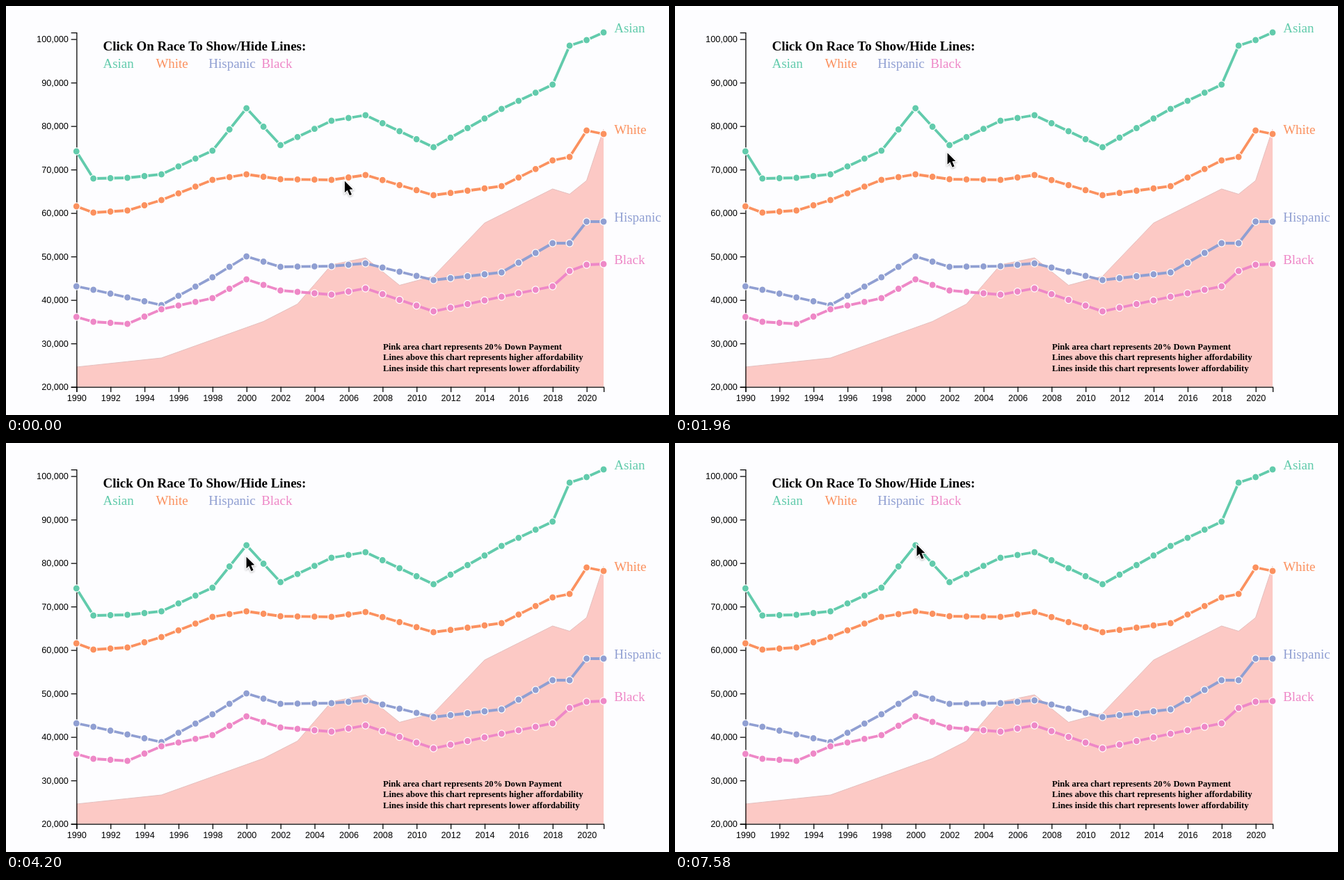
Animation, 953 px wide and 588 px high, one loop 8 s. Source, as an HTML page with a canvas:

```html
<!DOCTYPE html>
<html lang="en">
<head>
<meta charset="utf-8">
<title>Income and down payment</title>
<style>
html, body { margin: 0; width: 100%; height: 100%; overflow: hidden; background: #fdfdff; }
canvas { display: block; }
</style>
</head>
<body>
<canvas id="stage" width="953" height="588"></canvas>
<script>
const W = 953, H = 588, LOOP = 8000;
const U = 1.265; // chart unit in pixels
const HALF = U / 2; // axis lines sit half a unit off the data
const LEFT = 80 * U, RIGHT = 859, TOP = 38, BOTTOM = 547.5;
const YEARS = 31;
const SERIF = '"Liberation Serif", Times, serif';
const SANS = '"Liberation Sans", Arial, sans-serif';

// turning points; the years between are interpolated
const payment = [[0, 519], [5, 506], [11, 453.5], [13, 428.5], [15, 372], [17, 362], [19, 401.5],
  [21, 388.5], [24, 312], [28, 263], [29, 270.5], [30, 251], [31, 177]];
const turns = [0, 1, 3, 5, 8, 10, 12, 15, 17, 21, 25, 28, 29, 30, 31];
const groups = [
  { name: 'Asian', color: '#62cbac', ys: [209, 248, 247, 242, 208, 147, 200, 165, 157, 203, 148, 113, 57, 49, 38] },
  { name: 'White', color: '#fb915f', ys: [288, 297, 294, 279, 250, 242, 249, 250, 243, 272, 259, 222, 217, 179, 184] },
  { name: 'Hispanic', color: '#909fd2', ys: [403, 408, 419, 430, 390, 360, 375, 374, 370, 394, 383, 341, 341, 310, 310] },
  { name: 'Black', color: '#ee88c7', ys: [447, 454, 457, 436, 420, 393, 409, 415, 406, 439, 418, 403, 381, 372, 371] }
];

// pointer moves: start, end, x, y reached
const moves = [
  [-320, 420, 392, 228],
  [1120, 1840, 392, 211],
  [2220, 2960, 352, 213],
  [3060, 3800, 347, 172],
  [3900, 4640, 344, 148],
  [6300, 7020, 348, 146]
];

const arrow = [[0, 0], [0, 16.4], [3.7, 13], [7, 20.4], [10, 19.1], [6.8, 11.9], [11.7, 11.6]];

const lerp = (a, b, p) => a + (b - a) * p;
const xAt = i => LEFT + i * (RIGHT - LEFT) / YEARS;

// one point per year along the given turning points
function yearly(keys) {
  return Array.from({ length: YEARS + 1 }, (_, i) => {
    const k = Math.max(1, keys.findIndex(([year]) => year >= i));
    const [i0, y0] = keys[k - 1], [i1, y1] = keys[k];
    return [xAt(i), lerp(y0, y1, (i - i0) / (i1 - i0))];
  });
}

function trace(g, pts) {
  g.beginPath();
  pts.forEach(([x, y]) => g.lineTo(x, y));
}

function line(g, ...pts) {
  trace(g, pts);
  g.stroke();
}

function text(g, str, x, y, font, color = '#000', align = 'left') {
  g.font = font;
  g.fillStyle = color;
  g.textAlign = align;
  g.fillText(str, x, y);
}

function drawArea(g) {
  const edge = yearly(payment);
  trace(g, [...edge, [RIGHT, BOTTOM], [LEFT, BOTTOM]]);
  g.fillStyle = '#fcc9c5';
  g.fill();
  g.strokeStyle = '#e5bfbe';
  g.lineWidth = 1;
  line(g, ...edge);
}

function drawAxes(g) {
  const outer = LEFT - 6 * U, below = BOTTOM + 6 * U, font = `${10 * U}px ${SANS}`;
  const x0 = LEFT + HALF, x1 = RIGHT + HALF, y0 = BOTTOM + HALF, y1 = TOP + HALF;
  g.strokeStyle = '#000';
  g.lineWidth = U;
  line(g, [outer, y1], [x0, y1], [x0, y0], [outer, y0]);
  line(g, [x0, below], [x0, y0], [x1, y0], [x1, below]);
  for (let v = 20; v <= 100; v += 10) {
    const y = y0 - (v - 20) * 6.25;
    line(g, [outer, y], [LEFT, y]);
    text(g, v + ',000', LEFT - 9 * U, y + 3.2 * U, font, '#000', 'right');
  }
  for (let i = 0; i <= YEARS; i += 2) {
    const x = xAt(i) + HALF;
    line(g, [x, BOTTOM], [x, below]);
    text(g, String(1990 + i), x, BOTTOM + 16.1 * U, font, '#000', 'center');
  }
}

function drawGroup(g, { name, color, ys }, k) {
  const pts = yearly(turns.map((year, j) => [year, ys[j]]));
  const font = `${15 * U}px ${SERIF}`;
  g.strokeStyle = color;
  g.lineWidth = 3 * U;
  line(g, ...pts);
  g.fillStyle = color;
  g.strokeStyle = '#fff';
  g.lineWidth = U;
  for (const [x, y] of pts) {
    g.beginPath();
    g.arc(x, y, 4 * U, 0, 2 * Math.PI);
    g.fill();
    g.stroke();
  }
  text(g, name, RIGHT + 12 * U, pts[YEARS][1] + 0.4, font, color);
  text(g, name, 139.5 + 60 * U * k, 89, font, color);
}

function drawChart(g) {
  g.fillStyle = '#fdfdff';
  g.fillRect(0, 0, W, H);
  drawArea(g);
  drawAxes(g);
  groups.forEach((d, k) => drawGroup(g, d, k));
  text(g, 'Click On Race To Show/Hide Lines:', 139.5, 63.5, `bold ${15 * U}px ${SERIF}`);
  ['Pink area chart represents 20% Down Payment',
    'Lines above this chart represents higher affordability',
    'Lines inside this chart represents lower affordability'
  ].forEach((s, i) => text(g, s, 542, 494.3 + i * 12 * U, `bold ${10 * U}px ${SERIF}`));
}

function pointerAt(t) {
  let x = 550, y = 267;
  for (const [t0, t1, x1, y1] of moves) {
    if (t < t0) break;
    const p = Math.min(1, (t - t0) / (t1 - t0));
    const e = (1 - Math.cos(Math.PI * p)) / 2;
    x = lerp(x, x1, e);
    y = lerp(y, y1, e);
  }
  return [x, y];
}

function drawPointer(g, x, y) {
  g.save();
  g.translate(x - 0.4, y + 0.3);
  trace(g, arrow);
  g.closePath();
  g.lineWidth = 2.4;
  g.strokeStyle = '#fff';
  g.shadowColor = 'rgba(0,0,0,0.3)';
  g.shadowBlur = 3;
  g.shadowOffsetY = 1;
  g.stroke();
  g.shadowColor = 'transparent';
  g.fillStyle = '#000';
  g.fill();
  g.restore();
}

const ctx = document.getElementById('stage').getContext('2d');
const chart = document.createElement('canvas');
chart.width = W;
chart.height = H;
drawChart(chart.getContext('2d'));

const start = performance.now();
function frame() {
  const t = (performance.now() - start) % LOOP;
  ctx.drawImage(chart, 0, 0);
  drawPointer(ctx, ...pointerAt(t));
  requestAnimationFrame(frame);
}
frame();
</script>
</body>
</html>
```
